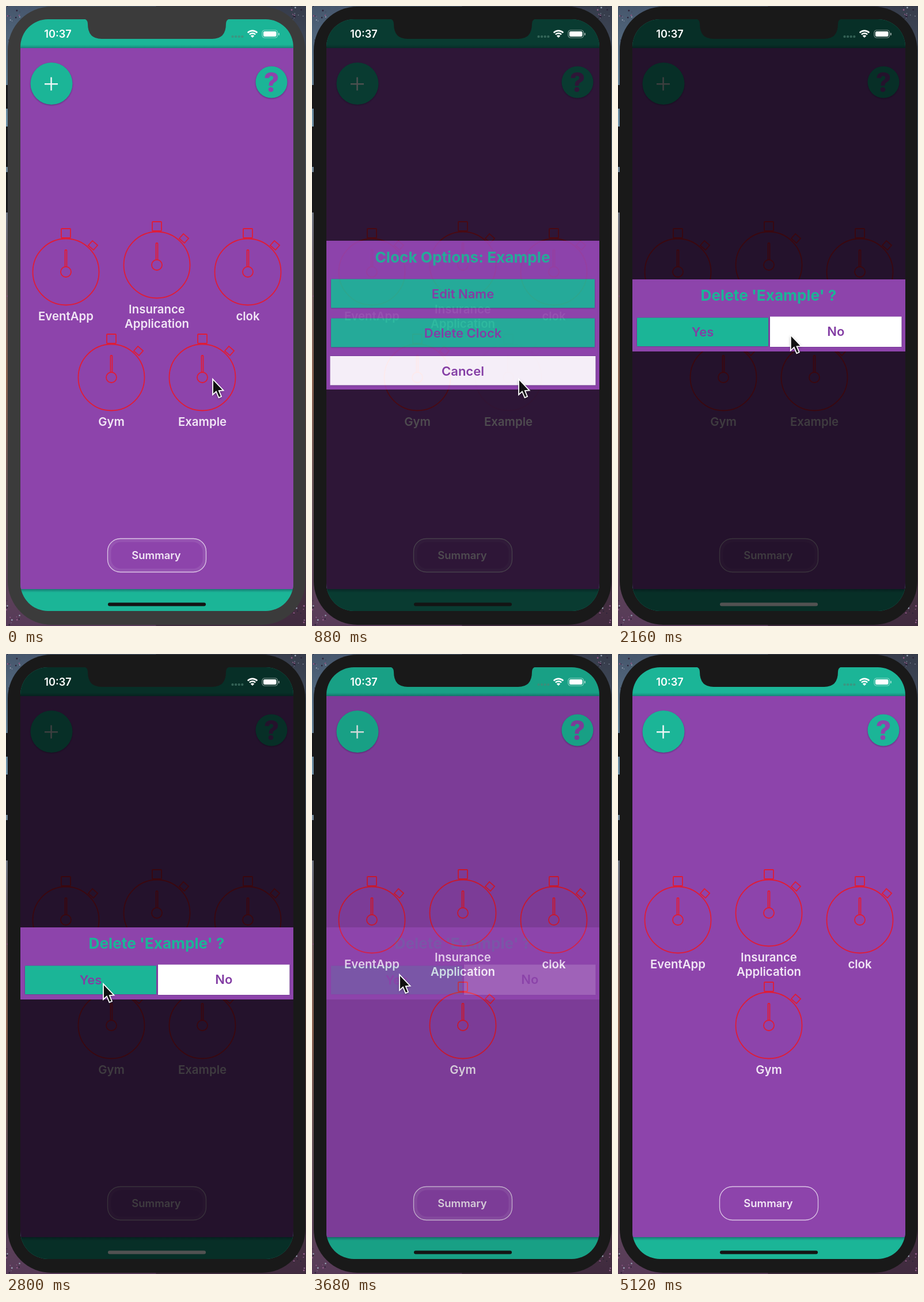
Write an HTML page with a canvas that moves like this. It is 521 px wide and 1075 px high and loops after 5200 ms.

```html
<!DOCTYPE html>
<html lang="en">
<head>
<meta charset="utf-8">
<title>Clock list</title>
<style>
  html, body { margin: 0; width: 100%; height: 100%; overflow: hidden; background: #191919; }
  canvas { display: block; }
</style>
</head>
<body>
<canvas id="stage" width="521" height="1075"></canvas>
<script>
const g = document.getElementById('stage').getContext('2d');
const W = 521, H = 1075, LOOP = 5200, STEP = 80;
const TEAL = '#1bb597', PURPLE = '#8d44ab', RED = '#e01c36', INK = '#833da4';

const ramp = (t, from, to) => Math.min(1, Math.max(0, (t - from) / (to - from)));
const pulse = (t, a, b, c, d) => ramp(t, a, b) * (1 - ramp(t, c, d));

function rect(x, y, w, h, fill) {
  g.fillStyle = fill;
  g.fillRect(x, y, w, h);
}

function round(x, y, w, h, r, fill) {
  g.beginPath();
  g.roundRect(x, y, w, h, r);
  if (fill) { g.fillStyle = fill; g.fill(); }
}

function disc(x, y, r, fill) {
  g.beginPath();
  g.arc(x, y, r, 0, 7);
  g.fillStyle = fill;
  g.fill();
}

function outline(color, width) {
  g.strokeStyle = color;
  g.lineWidth = width;
  g.stroke();
}

function shadow(color, blur = 0, dy = 0) {
  g.shadowColor = color;
  g.shadowBlur = blur;
  g.shadowOffsetY = dy;
}

function text(str, x, y, size, fill, weight = 600) {
  g.font = `${weight} ${size}px Inter, Roboto, sans-serif`;
  g.textAlign = 'center';
  g.fillStyle = fill;
  g.fillText(str, x, y);
}

function vertical(y0, y1, ...colors) {
  const v = g.createLinearGradient(0, y0, 0, y1);
  colors.forEach((c, i) => v.addColorStop(i / (colors.length - 1), c));
  return v;
}

function wallpaper() {
  rect(0, 0, W, H, vertical(0, H, '#46566c', '#6f92a8', '#6f6670', '#8a6250', '#66545a', '#573a58'));
  rect(W / 2, 0, W / 2, H, 'rgba(30,20,25,.4)');
  let seed = 7;
  const rnd = () => (seed = seed * 16807 % 2147483647) / 2147483647;
  for (let i = 0; i < 90; i++) {
    const x = rnd() < .5 ? rnd() * 26 : W - rnd() * 26;
    const y = rnd() < .6 ? (rnd() < .4 ? rnd() * 26 : H - rnd() * 45) : rnd() * H;
    disc(x, y, .5 + rnd(), ['#9aa6b8', '#8f5a86', '#2c2238'][i % 3]);
  }
}

function body(color) {
  for (const [y, h] of [[137, 41], [209, 70], [288, 70]]) rect(0, y, 6, h, '#17171a');
  round(3, 1, 517, 1072, 76, color);
}

function clock(x, y, label, iconAlpha = 1) {
  g.save();
  g.globalAlpha = iconAlpha;
  g.translate(x, y);
  g.beginPath();
  g.arc(0, 0, 57.5, 0, 7);
  g.moveTo(9, 0);
  g.arc(0, 0, 9, 0, 7);
  g.roundRect(-8, -75, 16, 16, 1);
  g.roundRect(-1.5, -38, 3, 29, 1);
  outline(RED, 1.8);
  g.translate(47, -46);
  g.rotate(.72);
  g.strokeRect(-6, -5.5, 12, 11);
  g.restore();
  label.forEach((line, i) => text(line, x, y + 84 + i * 24.5, 20.4, '#f1e6f5'));
}

function home(t) {
  rect(25, 23, 474, 1026, TEAL);
  rect(25, 67, 474, 7, vertical(67, 74, 'rgba(20,80,90,0)', 'rgba(20,60,80,.5)'));
  rect(25, 1011, 474, 6, vertical(1011, 1017, 'rgba(20,60,80,.5)', 'rgba(20,80,90,0)'));
  rect(25, 73, 474, 938, PURPLE);

  shadow('rgba(40,20,70,.5)', 3, 1);
  disc(79, 134.5, 36.5, TEAL);
  disc(461, 132, 27.5, TEAL);
  shadow('transparent');
  rect(67, 134, 23, 2.5, '#edf6f5');
  rect(77.3, 123.5, 2.5, 23, '#edf6f5');
  text('?', 461, 148.5, 46, PURPLE, 800);

  const gone = t >= 3440;
  clock(104, 461, ['EventApp']);
  clock(262, 449, ['Insurance', 'Application']);
  clock(420, 461, ['clok']);
  clock(gone ? 262 : 183, 644, ['Gym']);
  if (!gone) clock(341, 644, ['Example'], 1 - .87 * pulse(t, 160, 400, 960, 1200));

  if (t < 4400) {
    round(179.5, 926.5, 165, 52, 20);
    outline('rgba(255,255,255,.08)', 6);
  }
  round(176.5, 923.5, 171, 58, 22);
  outline('#dcc6e6', 1.3);
  text('Summary', 261, 959, 18.4, '#f1e6f5');
}

function button(label, x, y, w, h, fill, base) {
  shadow('rgba(40,20,80,.6)', 2);
  rect(x, y, w, h, fill);
  shadow('transparent');
  text(label, x + w / 2, base, 22, INK);
}

// The shade surrounds the panel; the panel cross-fades with what lies beneath it.
const under = document.createElement('canvas');
under.width = W;
under.height = H;
const ug = under.getContext('2d');

function panel(alpha, top, bottom, draw) {
  if (!alpha) return;
  const h = bottom - top, shade = `rgba(0,0,0,${.74 * alpha})`;
  rect(25, 23, 474, top - 23, shade);
  rect(25, bottom, 474, 1049 - bottom, shade);
  ug.clearRect(0, 0, W, H);
  ug.drawImage(g.canvas, 25, top, 474, h, 25, top, 474, h);
  rect(25, top, 474, h, PURPLE);
  draw();
  g.globalAlpha = 1 - alpha;
  g.drawImage(under, 0, 0);
  g.globalAlpha = 1;
}

function options() {
  text('Clock Options: Example', 261.5, 445, 26.2, TEAL, 700);
  button('Edit Name', 33, 473.5, 458, 50, TEAL, 507);
  button('Delete Clock', 33, 541.5, 458, 50, TEAL, 575);
  button('Cancel', 31.5, 607, 461, 50.5, '#fff', 641);
}

function confirmDelete() {
  text("Delete 'Example' ?", 261.5, 511, 26.2, TEAL, 700);
  button('Yes', 33, 540.5, 228, 49.5, TEAL, 573);
  button('No', 264, 538.5, 228.5, 52.5, '#fff', 572);
}

function status(t) {
  text('10:37', 90, 55, 18.2, '#fff');
  for (let i = 0; i < 4; i++) round(391.5 + i * 5.6, 51, 4, 4, 1.5, 'rgba(80,130,115,.6)');

  for (const r of [7.2, 11.6]) {
    g.beginPath();
    g.arc(428, 54.5, r, -2.36, -.78);
    outline('#fff', 2.6);
  }
  g.beginPath();
  g.moveTo(428, 55);
  g.arc(428, 55, 4.6, -2.36, -.78);
  g.fillStyle = '#fff';
  g.fill();

  round(445, 42, 26.5, 13, 4);
  outline('rgba(255,255,255,.5)', 1.2);
  round(447, 44, 22.5, 9, 2.2, '#fff');
  round(473, 46.5, 1.8, 4.5, 1, 'rgba(255,255,255,.6)');

  const level = 20 + 62 * pulse(t, 900, 1100, 3440, 3540);
  round(177, 1034.5, 170, 6, 3, `rgb(${level},${level},${level})`);
}

function notch(color) {
  g.beginPath();
  g.moveTo(134, 22);
  g.quadraticCurveTo(142, 23, 142, 31);
  g.quadraticCurveTo(142, 57, 166, 57);
  g.lineTo(358, 57);
  g.quadraticCurveTo(382, 57, 382, 31);
  g.quadraticCurveTo(382, 23, 390, 22);
  g.fillStyle = color;
  g.fill();
}

// time, x, y of the pointer tip
const PATH = [
  [0, 359, 647], [960, 359, 647], [1440, 324, 570], [2000, 324, 570], [2640, 169, 572],
  [3040, 169, 572], [3440, 147, 556], [3520, 147, 556], [3680, 152, 556], [4400, 545, 640], [LOOP, 545, 640]
];

function pointer(t) {
  const i = PATH.findIndex(p => p[0] > t);
  const [t0, x0, y0] = PATH[i - 1], [t1, x1, y1] = PATH[i];
  const k = ramp(t, t0, t1), e = k * k * (3 - 2 * k);
  g.save();
  g.translate(x0 + (x1 - x0) * e, y0 + (y1 - y0) * e);
  g.beginPath();
  [[0, 0], [0, 27], [6, 21.5], [10.5, 32], [15, 30], [10.8, 20], [18.5, 19.5]].forEach(p => g.lineTo(...p));
  g.closePath();
  shadow('rgba(0,0,0,.4)', 4, 2);
  g.fillStyle = '#111';
  g.fill();
  shadow('transparent');
  outline('#fff', 1.8);
  g.restore();
}

function frame() {
  const t = Math.floor(performance.now() / STEP) * STEP % LOOP;
  const shell = t < STEP ? '#3b3b3b' : '#191919';
  wallpaper();
  body(shell);
  g.save();
  round(25, 23, 474, 1026, 48);
  g.clip();
  home(t);
  panel(pulse(t, 660, 902, 1760, 2000), 407, 665, options);
  panel(pulse(t, 1760, 2000, 3477, 3719), 474, 599, confirmDelete);
  status(t);
  notch(shell);
  g.restore();
  pointer(t);
  requestAnimationFrame(frame);
}
requestAnimationFrame(frame);
</script>
</body>
</html>
```
